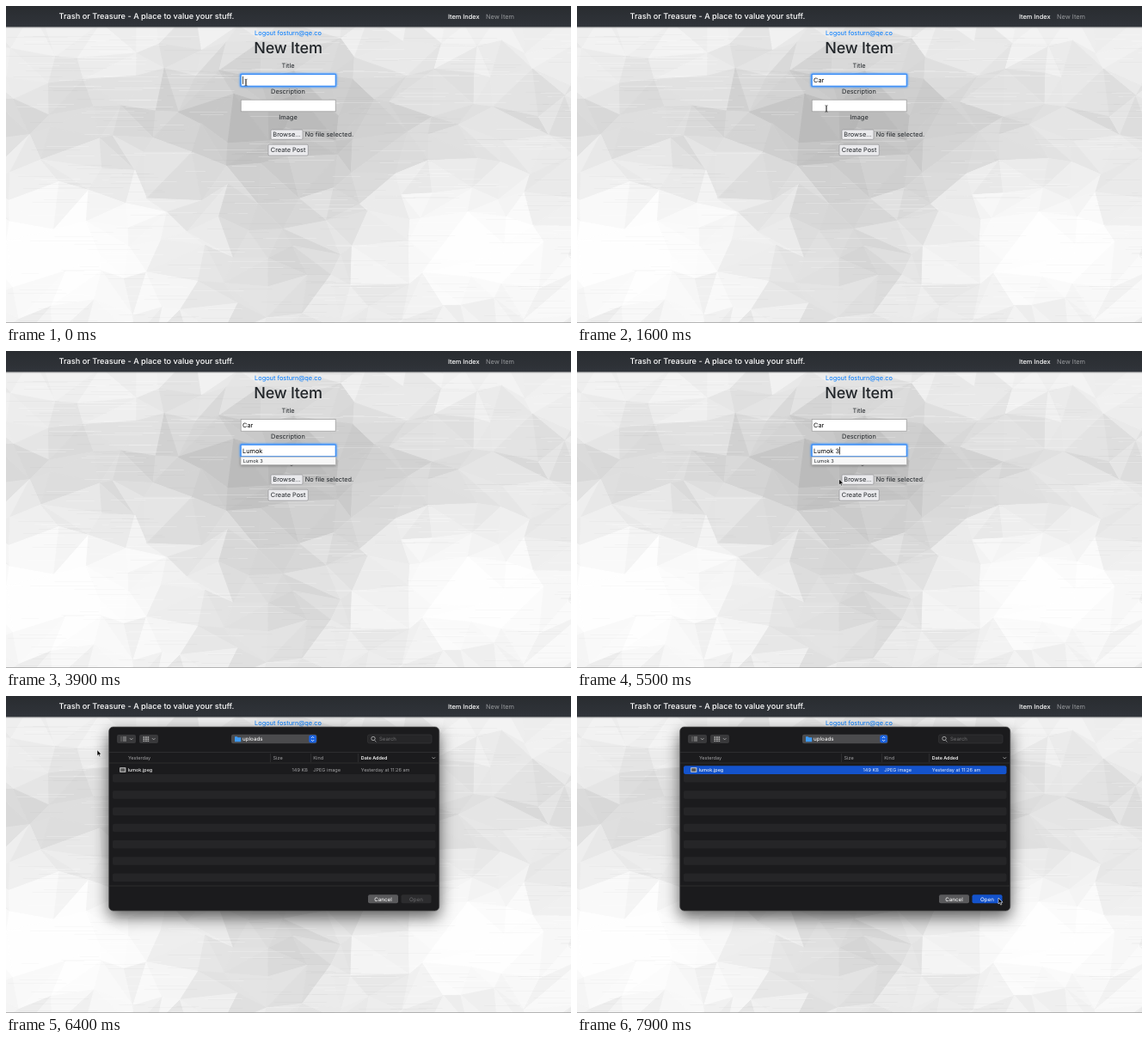
An HTML page with a canvas for the animation above (8 s loop, 657 by 369 pixels).

```html
<!DOCTYPE html>
<html lang="en">
<head>
<meta charset="utf-8">
<title>New Item</title>
<style>
html, body { margin: 0; width: 100%; height: 100%; overflow: hidden; background: #eee; }
canvas, svg { position: absolute; left: 0; top: 0; width: 657px; height: 369px; }
text { font-family: Inter, "Liberation Sans", sans-serif; font-size: 7.36px; fill: #212529;
  white-space: pre; text-rendering: geometricPrecision; }
.mid { text-anchor: middle; }
.field { fill: #fff; stroke: #999; stroke-width: .7; }
.focus { stroke: #2f86f6; stroke-width: 1; filter: drop-shadow(0 0 1px #3d95ff) drop-shadow(0 0 .8px #3d95ff); }
.button { fill: #eaeaed; stroke: #929296; stroke-width: .7; }
.button.pressed { fill: #cfcfd6; stroke: #77777f; }
#dialog text { font-size: 5.55px; fill: #a2a2a4; }
#dialog .white { fill: #f2f2f2; font-weight: 500; }
#dialog .big { font-size: 6.2px; }
.icon { fill: none; stroke: #bbb; stroke-width: .8; }
#panel { filter: drop-shadow(0 7px 9px rgba(0,0,0,.62)); }
</style>
</head>
<body>
<canvas id="mesh" width="657" height="369"></canvas>
<svg viewBox="0 0 657 369">
  <defs>
    <linearGradient id="bar" x2="0" y2="1"><stop stop-color="#292c30"/><stop offset="1" stop-color="#30343a"/></linearGradient>
  </defs>
  <rect width="657" height="24.5" fill="url(#bar)"/>
  <rect y="24.5" width="657" height="1" fill="#777" opacity=".45"/>
  <rect y="368" width="657" height="1" fill="#999" opacity=".7"/>
  <text x="61.5" y="15.2" style="font-size:9.2px;font-weight:500;fill:#fff">Trash or Treasure - A place to value your stuff.</text>
  <text x="514" y="14.8" style="font-weight:500;fill:#fff">Item Index</text>
  <text x="558" y="14.8" style="fill:#97999c">New Item</text>

  <g class="mid">
    <text x="328" y="33.6" style="fill:#007bff">Logout fosturn@qe.co</text>
    <text x="328" y="55.2" style="font-size:18px;font-weight:500;letter-spacing:-.25px">New Item</text>
    <text x="328" y="72.2">Title</text>
    <text x="328" y="102">Description</text>
    <text x="328" y="131.8">Image</text>
  </g>
  <rect id="titleBox" class="field" x="273.2" y="79.6" width="110" height="13.6"/>
  <text id="title" x="275" y="89.2" style="fill:#000"></text>
  <rect id="descBox" class="field" x="273.2" y="109.2" width="110" height="13.6"/>
  <text id="desc" x="275" y="118.9" style="fill:#000"></text>
  <rect id="caret" width=".7" height="9" fill="#000"/>
  <rect id="browse" class="button" x="308" y="144" width="37" height="11.4" rx="1.4"/>
  <text class="mid" x="326.5" y="152.3">Browse...</text>
  <text x="347.8" y="152.3">No file selected.</text>
  <rect class="button" x="305" y="161.2" width="46.3" height="13" rx="1.4"/>
  <text class="mid" x="328.1" y="170.4">Create Post</text>
  <g id="suggest">
    <rect x="273" y="123.2" width="110.6" height="9.4" fill="#f7f7f7" stroke="#aaa" stroke-width=".6" style="filter:drop-shadow(0 1.5px 1.5px rgba(0,0,0,.3))"/>
    <text x="275.8" y="130" style="font-size:5.6px">Lumok 3</text>
  </g>

  <g id="dialog">
    <rect id="panel" x="119.7" y="36" width="384" height="214" rx="5" fill="#1b1b1d" stroke="#48484a" stroke-width=".7"/>
    <g fill="#39393b">
      <rect x="129" y="45" width="22" height="10" rx="2"/>
      <rect x="155" y="45" width="22" height="10" rx="2"/>
      <rect x="262" y="44.7" width="99.5" height="10.6" rx="2.2" fill="#4b4b4d"/>
      <rect x="420.5" y="45" width="74.5" height="10" rx="2" fill="#262628" stroke="#38383a" stroke-width=".6"/>
    </g>
    <path class="icon" d="M133.5 48h1m1.3 0h4.2m-6.500 2h1m1.300 0h4.200m-6.500 2h1m1.300 0h4.200M144 49.200l1.700 1.700 1.700-1.700M170 49.200l1.700 1.700 1.700-1.700"/>
    <path class="icon" stroke-dasharray="1.7 .8" style="stroke-width:1.4" d="M159.500 48h7m-7 2.200h7m-7 2.200h7"/>
    <path d="M266 47.300h2.700l.9 1h3.600v4.900h-7.200z" fill="#3f9bf2"/>
    <text class="white big" x="275" y="52.200">uploads</text>
    <rect x="352.300" y="45.400" width="8.600" height="9.200" rx="2" fill="#1a62e0"/>
    <path class="icon" style="stroke:#fff" d="M355 49l1.600-1.700 1.600 1.700m-3.200 2l1.600 1.700 1.600-1.700"/>
    <path class="icon" d="M428.600 51.600l1.800 1.800M429.200 49.500a2.200 2.200 0 1 1-4.400 0a2.200 2.200 0 1 1 4.400 0"/>
    <text x="434" y="52.200" style="font-size:6px;fill:#6f6f71">Search</text>
    <path d="M120 65.500H503.500M120 78H503.500M120 221H503.500M307.500 67v10M354.500 67v10M409.500 67v10" stroke="#3a3a3c" stroke-width=".6"/>
    <text x="142" y="73.900">Yesterday</text>
    <text x="310.500" y="73.900">Size</text>
    <text x="357.300" y="73.900">Kind</text>
    <text class="white" x="412.800" y="73.900" style="font-size:5.4px;font-weight:600">Date Added</text>
    <path class="icon" d="M495.600 71.300l1.700 1.700 1.700-1.700"/>
    <g id="rows" fill="#252527"></g>
    <rect id="picked" x="124" y="81.200" width="375.500" height="9.700" rx="2" fill="#1453cc"/>
    <rect x="132.300" y="83.300" width="7" height="5.400" fill="#ddd"/>
    <path d="M133.200 84.200h5.200v3.600h-5.200z" fill="#555"/>
    <text class="white" x="141.700" y="88.100" style="font-size:5.4px">lumok.jpeg</text>
    <g id="details">
      <text x="350.800" y="88.100" text-anchor="end">149 KB</text>
      <text x="357.300" y="88.100">JPEG image</text>
      <text x="412.800" y="88.100">Yesterday at 11:26 am</text>
    </g>
    <rect x="421" y="231.200" width="35" height="10" rx="2" fill="#5a5a5c"/>
    <text class="mid white big" x="438.500" y="238.500">Cancel</text>
    <rect id="openBox" x="459.500" y="231.200" width="35" height="10" rx="2"/>
    <text id="openText" class="mid big" x="477" y="238.500">Open</text>
  </g>
  <path id="beam" d="M-1.500-3.800q1.500 0 1.500 1v5.600q0 1-1.500 1M1.500-3.800q-1.500 0-1.500 1v5.600q0 1 1.500 1" fill="none" stroke="#222" stroke-width=".7"/>
  <path id="arrow" d="M0 0V7l1.600-1.400 1.100 2.500 1.200-.5-1.100-2.400h2.200z" fill="#000" stroke="#fff" stroke-width=".6"/>
</svg>
<script>
const $ = id => document.getElementById(id);

// Low-poly backdrop: soft grey field sampled on a jittered triangle grid
let seed = 11;
const rnd = () => (seed = seed * 16807 % 2147483647) / 2147483647;
const blobs = [ // x, y, rx, ry, change in grey
  [320, 130, 130, 85, -40], [60, 135, 260, 55, -17], [600, 135, 260, 55, -17],
  [320, 290, 105, 110, -20], [65, 285, 120, 60, 20], [545, 285, 110, 60, 20]
];
const grey = (x, y) => blobs.reduce((sum, [bx, by, rx, ry, v]) =>
  sum + v * Math.exp(-(((x - bx) / rx) ** 2) - ((y - by) / ry) ** 2), 240);

function drawMesh() {
  const c = $('mesh').getContext('2d'), cell = 40, points = [];
  for (let j = 0; j < 13; j++) {
    points.push([]);
    for (let i = 0; i < 20; i++)
      points[j].push([(i - 1 + rnd() * .8) * cell, (j - 1 + rnd() * .8) * cell * .85]);
  }
  const triangle = (...p) => {
    const x = (p[0][0] + p[1][0] + p[2][0]) / 3, y = (p[0][1] + p[1][1] + p[2][1]) / 3;
    const base = grey(x, y), v = Math.min(254, base + (rnd() - .5) * (base > 246 ? 7 : 15));
    c.fillStyle = c.strokeStyle = `rgb(${v},${v},${v})`;
    c.beginPath();
    p.forEach(q => c.lineTo(...q));
    c.closePath();
    c.fill();
    c.stroke();
  };
  for (let j = 0; j < 12; j++) for (let i = 0; i < 19; i++) {
    const a = points[j][i], b = points[j][i + 1], d = points[j + 1][i], e = points[j + 1][i + 1];
    if (rnd() < .5) { triangle(a, b, d); triangle(b, d, e); }
    else { triangle(a, b, e); triangle(a, d, e); }
  }
  for (let n = 0; n < 500; n++) {
    c.fillStyle = rnd() < .5 ? 'rgba(255,255,255,.2)' : 'rgba(0,0,0,.018)';
    c.fillRect(rnd() * 657, Math.floor(rnd() * 369), 20 + rnd() * 60, 1);
  }
}
drawMesh();

for (let i = 0; i < 7; i++)
  $('rows').innerHTML += `<rect x="124" y="${90.9 + i * 19.25}" width="375.5" height="9.6" rx="2"/>`;

const titleKeys = [100, 200, 500], descKeys = [2200, 2600, 3100, 3600, 3700, 4200, 4500];
const caretOff = [[1000, 1700], [3900, 4200], [5100, 5500], [5800, 8000]];
const beamPath = [[0, 279, 89], [900, 287, 92], [1400, 290, 119.5], [2100, 290, 119.5]];
const arrowPath = [[5100, 291, 125], [5500, 304.7, 149], [5800, 320, 151], [6000, 320, 151],
  [6300, 220.7, 94.5], [6400, 106, 62.7], [6600, 112, 67], [6800, 145, 86.5], [7200, 145, 86.5],
  [7800, 490, 235], [8000, 490, 235]];

const typed = (text, keys, t) => text.slice(0, keys.filter(k => k <= t).length);
const show = (id, on) => $(id).style.display = on ? '' : 'none';

function place(id, path, t) {
  const i = path.findIndex(p => p[0] > t);
  if (i < 1) return;
  const [t0, x0, y0] = path[i - 1], [t1, x1, y1] = path[i], k = (t - t0) / (t1 - t0);
  $(id).setAttribute('transform', `translate(${x0 + (x1 - x0) * k} ${y0 + (y1 - y0) * k})`);
}

function draw(t) {
  const inTitle = t < 1700, inDesc = !inTitle && t < 5800, picked = t >= 7200;
  $('title').textContent = typed('Car', titleKeys, t);
  $('desc').textContent = typed('Lumok 3', descKeys, t);
  $('titleBox').classList.toggle('focus', inTitle);
  $('descBox').classList.toggle('focus', inDesc);
  $('browse').classList.toggle('pressed', t >= 5800);
  show('suggest', t >= 2600 && t < 5800);

  const active = $(inTitle ? 'title' : 'desc');
  $('caret').setAttribute('x', 275 + active.getComputedTextLength());
  $('caret').setAttribute('y', inTitle ? 81.9 : 111.5);
  show('caret', !caretOff.some(([a, b]) => t >= a && t < b));

  show('dialog', t >= 6400);
  show('picked', picked);
  $('openBox').style.fill = picked ? '#1453cc' : '#2c2c2e';
  $('openText').style.fill = picked ? '#fff' : '#69696b';
  for (const el of $('details').children) el.style.fill = picked ? '#e4ebfa' : '';

  show('beam', t < 100 || t >= 900 && t < 2100);
  show('arrow', t >= 5100);
  place('beam', beamPath, t);
  place('arrow', arrowPath, t);
}

const start = performance.now();
function tick() {
  const t = (performance.now() - start) % 8000;
  draw(Math.floor(t / 100) * 100);
  requestAnimationFrame(tick);
}
tick();
</script>
</body>
</html>
```
